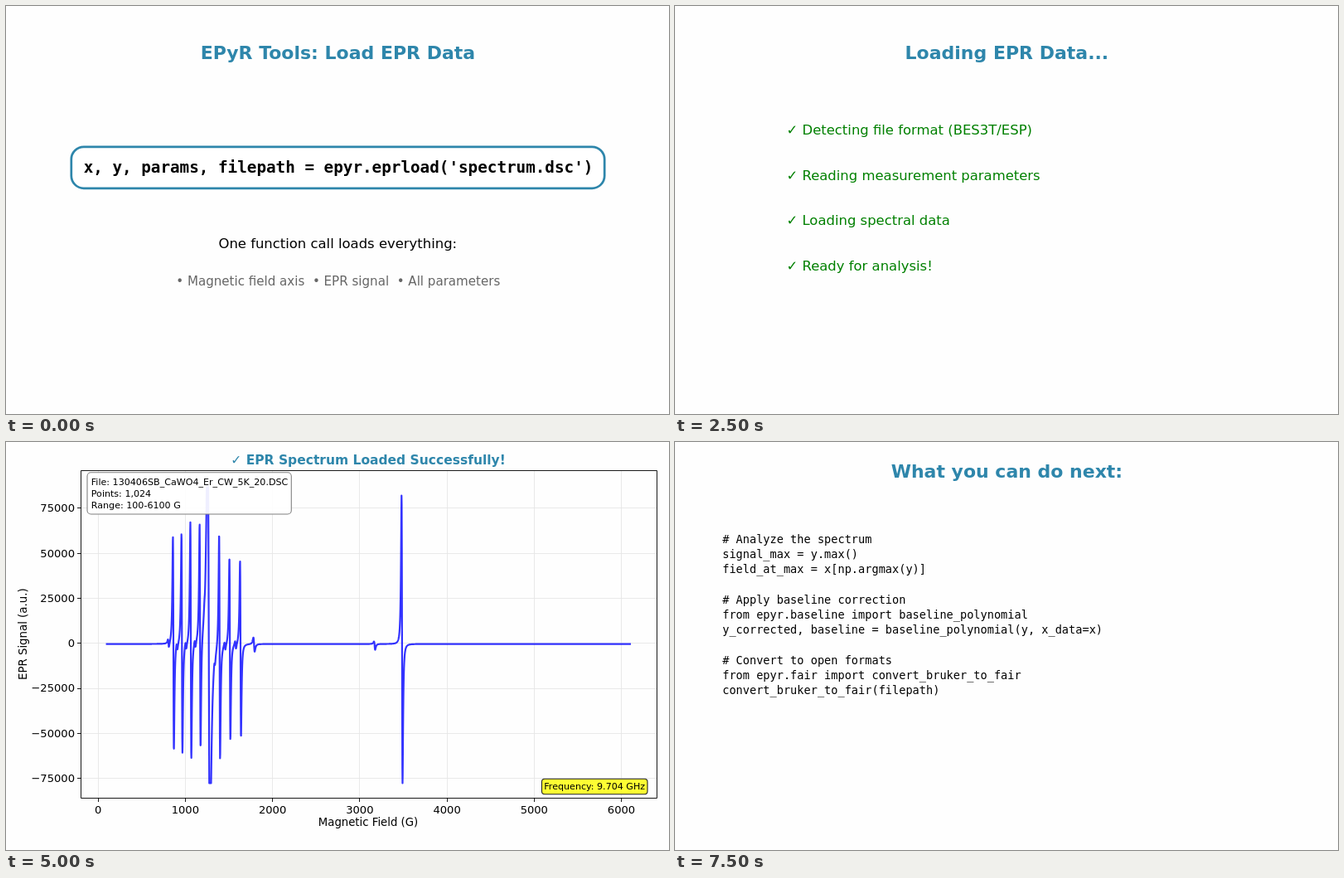
Recreate the animation shown at these times as an HTML page. Size 800 by 492 pixels, loop 10 s.

```html
<!DOCTYPE html>
<html lang="en">
<head>
<meta charset="utf-8">
<title>Load EPR data</title>
<style>
html, body { margin: 0; height: 100%; overflow: hidden; background: #fefefe; }
svg { display: block; width: 800px; height: 492px; font-family: "DejaVu Sans", sans-serif; }
text { white-space: pre; }
.title { font-weight: bold; fill: #2e86ab; }
.mono { font-family: "DejaVu Sans Mono", monospace; }
</style>
</head>
<body>
<svg id="stage" viewBox="0 0 800 492"></svg>
<script>
const stage = document.getElementById('stage');
const SCENE_MS = 2500;

function add(parent, tag, attrs, content = '') {
  const el = document.createElementNS('http://www.w3.org/2000/svg', tag);
  for (const key in attrs) el.setAttribute(key, attrs[key]);
  el.textContent = content;
  return parent.appendChild(el);
}
const label = (g, x, y, size, str, attrs = {}) =>
  add(g, 'text', { x, y, 'font-size': size, ...attrs }, str);
const box = (g, x, y, width, height, rx, attrs) =>
  add(g, 'rect', { x, y, width, height, rx, 'stroke-width': 1.1, ...attrs });
const mid = { 'text-anchor': 'middle' };
const title = { ...mid, class: 'title' };
const scenes = [0, 1, 2, 3].map(() => add(stage, 'g', {}));
const [intro, loading, plot, next] = scenes;

// Intro
label(intro, 400.4, 64.4, 22, 'EPyR Tools: Load EPR Data', title);
box(intro, 78.8, 169.8, 643.4, 50, 15, { fill: '#fff', stroke: '#2e86ab', 'stroke-width': 2.7 });
label(intro, 401, 201, 19.27, "x, y, params, filepath = epyr.eprload('spectrum.dsc')",
  { ...mid, class: 'mono', 'font-weight': 'bold' });
label(intro, 400.3, 291.5, 16.46, 'One function call loads everything:', mid);
label(intro, 400.8, 336.5, 15.08, '• Magnetic field axis  • EPR signal  • All parameters',
  { ...mid, fill: '#666' });

// Loading steps
label(loading, 400.4, 64.4, 22, 'Loading EPR Data...', title);
['Detecting file format (BES3T/ESP)', 'Reading measurement parameters',
  'Loading spectral data', 'Ready for analysis!'].forEach((step, i) =>
  label(loading, 134.5, 155 + i * 54.5, 16.46, '✓ ' + step, { fill: 'green' }));

// Spectrum plot
const L = 90.5, R = 785.5, T = 34.5, B = 429.5;
const px = field => 111.15 + field * 0.10523;
const py = signal => 242.8 - signal * 0.0021712;
const snap = v => Math.floor(v) + 0.5;
const line = (d, stroke) => add(plot, 'path', { d, stroke, fill: 'none', 'stroke-width': 0.9 });

for (let v = 0; v <= 6000; v += 1000) {
  const x = snap(px(v));
  line(`M${x} ${T}V${B}`, '#e7e7e7');
  line(`M${x} ${B}v4.5`, '#000');
  label(plot, px(v), 447.5, 13.1, v, mid);
}
for (let v = -75000; v <= 75000; v += 25000) {
  const y = snap(py(v));
  line(`M${L} ${y}H${R}`, '#e7e7e7');
  line(`M${L} ${y}h-4.5`, '#000');
  label(plot, 83, py(v) + 4.4, 13.1, String(v).replace('-', '−'), { 'text-anchor': 'end' });
}

// Resonances in pixels: the wide central line, the strong single line, two faint ones
const lines = [
  { c: 244.7, up: 260, down: 260, w: 2.4 },
  { c: 477.9, up: 180, down: 170, w: 1 },
  { c: 299.3, up: 8, down: 9, w: 1.3 },
  { c: 444.7, up: 3, down: 7, w: 1.2 }
];
// Hyperfine series with slowly growing spacing; each line has a weak companion
const heights = [129, 133, 146, 138, 0, 138, 105, 101];
heights.forEach((up, k) => {
  const c = 202 + 10.1 * k + 0.21 * k * k;
  lines.push({ c, up, down: 0.6 * up + 52 * Math.sign(up), w: 1 });
  lines.push({ c: c - 6, up: 4, down: 6, w: 1 });
});
// Derivative of a Lorentzian, scaled to a peak of 1
const shape = u => u / (1 + u * u) ** 2 / 0.3248;
function trace(x) {
  let y = 243.6;
  for (const { c, up, down, w } of lines) y += (x < c ? up : down) * shape((x - c) / w);
  return Math.min(411.5, Math.max(53.5, y));
}
const points = [];
for (let x = px(100); x <= px(6100); x += 0.2) points.push(x.toFixed(2) + ',' + trace(x).toFixed(2));
add(plot, 'polyline', { points: points.join(' '), fill: 'none', stroke: '#00f',
  'stroke-opacity': 0.8, 'stroke-width': 2.2, 'stroke-linejoin': 'round', 'stroke-linecap': 'square' });

line(`M${L} ${T}H${R}V${B}H${L}Z`, '#000');
label(plot, 437, 27.2, 15.5, '✓ EPR Spectrum Loaded Successfully!', title);
label(plot, 437, 463.4, 13.25, 'Magnetic Field (G)', mid);
label(plot, 0, 0, 13.33, 'EPR Signal (a.u.)', { ...mid, transform: 'translate(25.3 231.7) rotate(-90)' });

box(plot, 98, 36.8, 246.3, 50.2, 4.5, { fill: '#fff', 'fill-opacity': 0.92, stroke: '#808080' });
['File: 130406SB_CaWO4_Er_CW_5K_20.DSC', 'Points: 1,024', 'Range: 100-6100 G'].forEach((str, i) =>
  label(plot, 102.8, 51.7 + i * 14, 11.1, str));
box(plot, 646.5, 406.3, 127.5, 18.4, 3.5, { fill: '#ff3', stroke: '#222' });
label(plot, 710.2, 419.2, 11.1, 'Frequency: 9.704 GHz', mid);

// Next steps
label(next, 400.4, 42.5, 22, 'What you can do next:', title);
`# Analyze the spectrum
signal_max = y.max()
field_at_max = x[np.argmax(y)]

# Apply baseline correction
from epyr.baseline import baseline_polynomial
y_corrected, baseline = baseline_polynomial(y, x_data=x)

# Convert to open formats
from epyr.fair import convert_bruker_to_fair
convert_bruker_to_fair(filepath)`.split('\n').forEach((code, i) =>
  label(next, 57.2, 122 + i * 18.2, 13.62, code, { class: 'mono' }));

function draw() {
  const current = Math.floor(performance.now() / SCENE_MS) % scenes.length;
  scenes.forEach((g, i) => g.setAttribute('display', i === current ? 'inline' : 'none'));
  requestAnimationFrame(draw);
}
draw();
</script>
</body>
</html>
```
